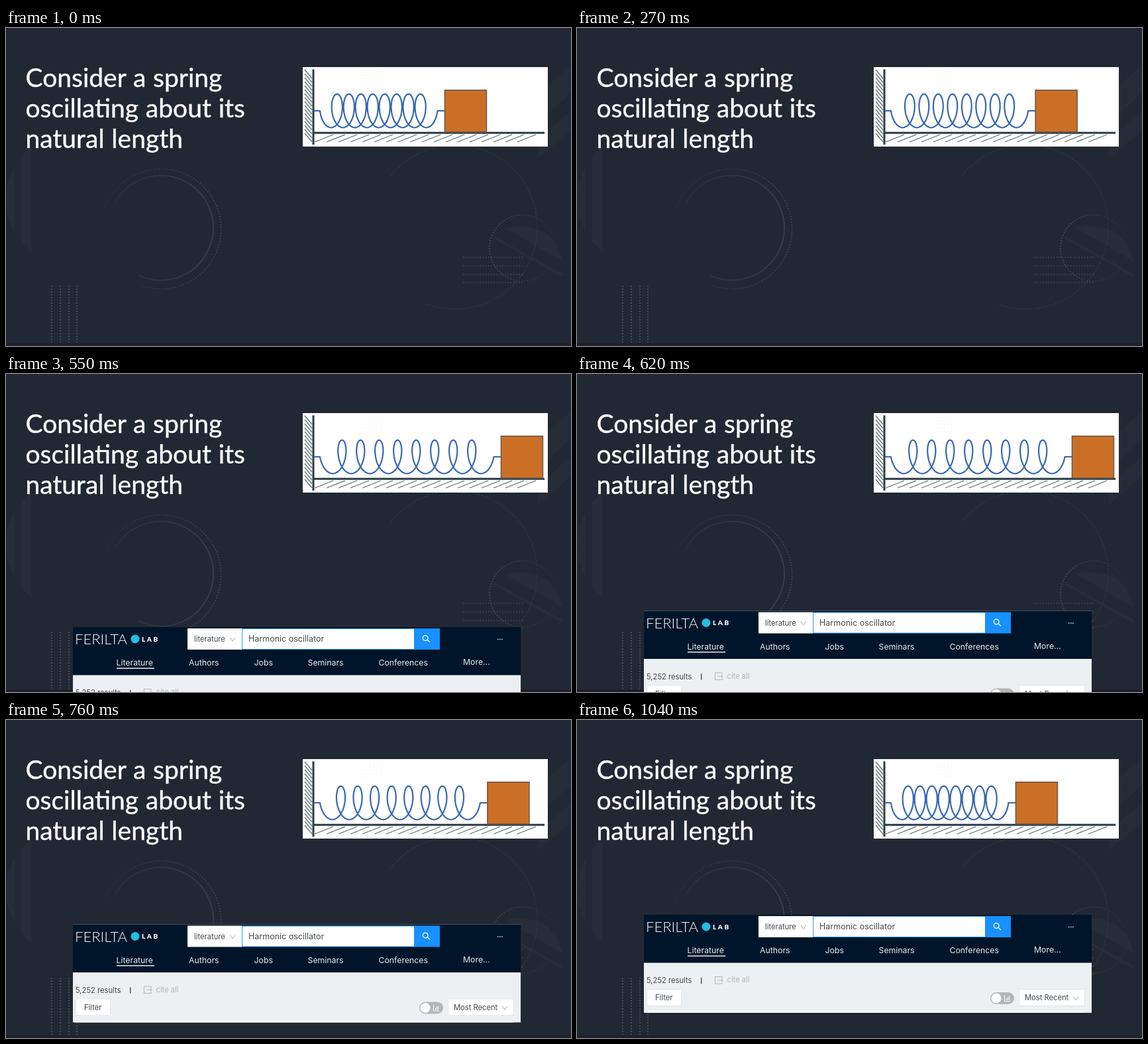
An HTML page that plays this animation: 853x480 px, repeating every 1.11 s.

```html
<!DOCTYPE html>
<html lang="en">
<head>
<meta charset="utf-8">
<title>Spring oscillation</title>
<style>
html, body { margin: 0; width: 100%; height: 100%; overflow: hidden; background: #212833; }
svg { display: block; }
.title { font: 39px Lato, Carlito, sans-serif; word-spacing: .8px; fill: #fff; stroke: #fff; stroke-width: .4; }
.dots { fill: none; stroke-width: 1.7; stroke-linecap: round; stroke-dasharray: 0 4.2; }
.ui { font: 11.2px Inter, Roboto, sans-serif; fill: #45494d; }
.nav { font-size: 12.3px; fill: #e6eaee; }
.line { fill: none; stroke: #b4b9be; stroke-width: 1.1; }
</style>
</head>
<body>
<svg width="853" height="480" viewBox="0 0 853 480">
  <defs>
    <linearGradient id="fade" gradientUnits="userSpaceOnUse" x1="145" y1="0" x2="325" y2="0">
      <stop offset="0" stop-color="#29323c"/><stop offset="1" stop-color="#46545d"/>
    </linearGradient>
    <linearGradient id="fadeRight" gradientUnits="userSpaceOnUse" x1="730" y1="0" x2="830" y2="0">
      <stop offset="0" stop-color="#4a5861"/><stop offset="1" stop-color="#252d37"/>
    </linearGradient>
    <clipPath id="bands"><path d="M0 150h13v220H0zM23 150h15v220H23z"/></clipPath>
  </defs>

  <!-- backdrop -->
  <rect width="853" height="480" fill="#212833"/>
  <g fill="#262d38">
    <circle cx="99" cy="258" r="99" clip-path="url(#bands)"/>
    <path fill="#252c37" d="M818 87L853 57V98L818 130zM803 168L853 125V155L803 197z"/>
    <path d="M753 302Q792 294 817 311Q834 326 840 352zM735 313L842 372L838 375L738 319z"/>
  </g>
  <path class="dots" stroke="url(#fade)" d="M150 270A90.5 90.5 0 1 1 205 389"/>
  <path fill="none" stroke="url(#fade)" stroke-opacity=".6" stroke-width="1.5" d="M165 263A79 79 0 1 1 200 373"/>
  <path class="dots" stroke="#333e47" d="M582 222A124 124 0 1 1 636 417"/>
  <circle class="dots" stroke="url(#fadeRight)" cx="780" cy="332" r="50"/>
  <path class="dots" stroke="#55656c" d="M69 390V480M82 390V480M95 390V480M107 390V480"/>
  <path class="dots" stroke="#43515a" d="M691 346H781M691 359H781M691 372H781M691 384H781"/>
  <rect y="476" width="853" height="4" fill="#1f202b"/>

  <g class="title">
    <text x="29.5" y="89">Consider a spring</text>
    <text x="29.5" y="135">oscillating about its</text>
    <text x="29.5" y="181">natural length</text>
  </g>

  <!-- spring and block -->
  <rect x="448" y="59" width="370" height="120" fill="#fff"/>
  <path stroke="#f3f3f3" stroke-width="1.4" stroke-dasharray="1.4 4" d="M538 66h29M538 71h29M538 76h29M538 81h29M538 86h29"/>
  <path id="hatch" fill="none" stroke="#5f7073" stroke-width="1.3"/>
  <path fill="none" stroke="#2b3c45" stroke-width="3" d="M464 62.5V176M464 158.3H813"/>
  <path id="spring" fill="none" stroke="#3768b1" stroke-width="2.2" stroke-linejoin="round"/>
  <rect id="block" y="93.8" width="63" height="63.2" fill="#cc6f26" stroke="#6f594b" stroke-width="1.6"/>

  <!-- search page, drawn from its top edge -->
  <g id="panel" class="ui">
    <rect x="101" width="676" height="148" fill="#ecf0f3"/>
    <rect x="101" width="676" height="72.5" fill="#001529"/>
    <text x="104" y="26" font-family="Lato, sans-serif" font-size="22" font-weight="300" fill="#fff">FERILTA</text>
    <circle cx="195" cy="18" r="6.5" fill="#20bfe4"/>
    <text x="205" y="21.5" font-family="Lato, sans-serif" font-size="10" font-weight="900" letter-spacing="2.6" fill="#fff">LAB</text>

    <rect x="274" y="2" width="82" height="32" fill="#fff"/>
    <text x="284" y="22">literature</text>
    <path class="line" d="M338 16l4 5l4 -5"/>
    <rect x="356.5" y="2.5" width="260" height="31" fill="#fff" stroke="#2f9bff"/>
    <text x="366" y="22" font-size="12.5">Harmonic oscillator</text>
    <rect x="616" y="2" width="39" height="32" fill="#1890ff"/>
    <path fill="none" stroke="#fff" stroke-width="1.3" d="M636.5 19.5L640 23M637 16.5a3.8 3.8 0 1 0 -7.6 0a3.8 3.8 0 1 0 7.6 0"/>
    <path stroke="#e6eaee" stroke-width="1.5" d="M742 18.5h1.5M745 18.5h1.5M748 18.5h1.5"/>

    <g class="nav">
      <text x="166.5" y="58">Literature</text>
      <text x="276" y="58">Authors</text>
      <text x="374.5" y="58">Jobs</text>
      <text x="455.5" y="58">Seminars</text>
      <text x="562.5" y="58">Conferences</text>
      <text x="690" y="57">More...</text>
      <rect x="167" y="61.5" width="57" height="1.5"/>
    </g>

    <text x="105" y="103">5,252 results</text>
    <rect x="187" y="95" width="1.4" height="9"/>
    <path class="line" d="M219 96V93.5H208.5V104H219V101.5M212 98.7H220M218 96.7l2 2l-2 2"/>
    <text x="226.5" y="102" fill="#b0b5ba">cite all</text>
    <rect x="105.5" y="112.5" width="52" height="25" rx="1.5" fill="#fff" stroke="#e2e5e8"/>
    <text x="118" y="129">Filter</text>
    <rect x="624" y="117" width="36" height="18" rx="9" fill="#b3b6b9"/>
    <circle cx="633" cy="126" r="7.5" fill="#fff"/>
    <path fill="none" stroke="#fff" d="M645.5 121.5V130.5H654M648.5 129V126M650.5 129V124.5M652.5 129V123"/>
    <rect x="667.5" y="112.5" width="99" height="25" rx="1.5" fill="#fff" stroke="#e2e5e8"/>
    <text x="676" y="129">Most Recent</text>
    <path class="line" d="M749 123.5l4 5l4 -5"/>
    <rect x="106" y="145.5" width="660" height="2.5" fill="#fff"/>
  </g>
</svg>
<script>
const LOOP = 1110, FIRST = 130, STEP = 70, STEPS = 15;
const el = id => document.getElementById(id);
const spring = el('spring'), block = el('block'), panel = el('panel');

function hatchPath() {
  let d = '';
  for (let y = 63; y < 164; y += 6) d += `M451 ${y}l11 13`;
  for (let x = 466; x < 786; x += 18) d += `M${x} 172l28 -11`;
  return d;
}

// A prolate trochoid of 8.5 turns between two short stubs.
function springPath(end) {
  const left = 474, right = end - 11, r = 12.3, turns = 8.5;
  const drift = right - left - 2 * r;
  let d = 'M465 125';
  for (let i = 0, n = 340; i <= n; i++) {
    const a = i / n * turns * 2 * Math.PI;
    const x = left + r + drift * i / n - r * Math.cos(a);
    d += `L${x.toFixed(2)} ${(125 + 25.3 * Math.sin(a)).toFixed(2)}`;
  }
  return d + `H${end}`;
}

function draw(time) {
  const t = time % LOOP;
  const k = t < FIRST ? 0 : 1 + Math.floor((t - FIRST) / STEP);
  const phase = k === STEPS - 1 ? 0 : k;   // the swing restarts one step early
  const x = 705.4 - 43 * Math.cos(2 * Math.PI * phase / STEPS);
  spring.setAttribute('d', springPath(x));
  block.setAttribute('x', x);
  const top = Math.min(480, Math.max(294, 480 - 24.5 * (k - 3)));
  panel.setAttribute('transform', `translate(0 ${top})`);
}

el('hatch').setAttribute('d', hatchPath());
const start = performance.now();
function tick() {
  draw(performance.now() - start);
  requestAnimationFrame(tick);
}
tick();
</script>
</body>
</html>
```
